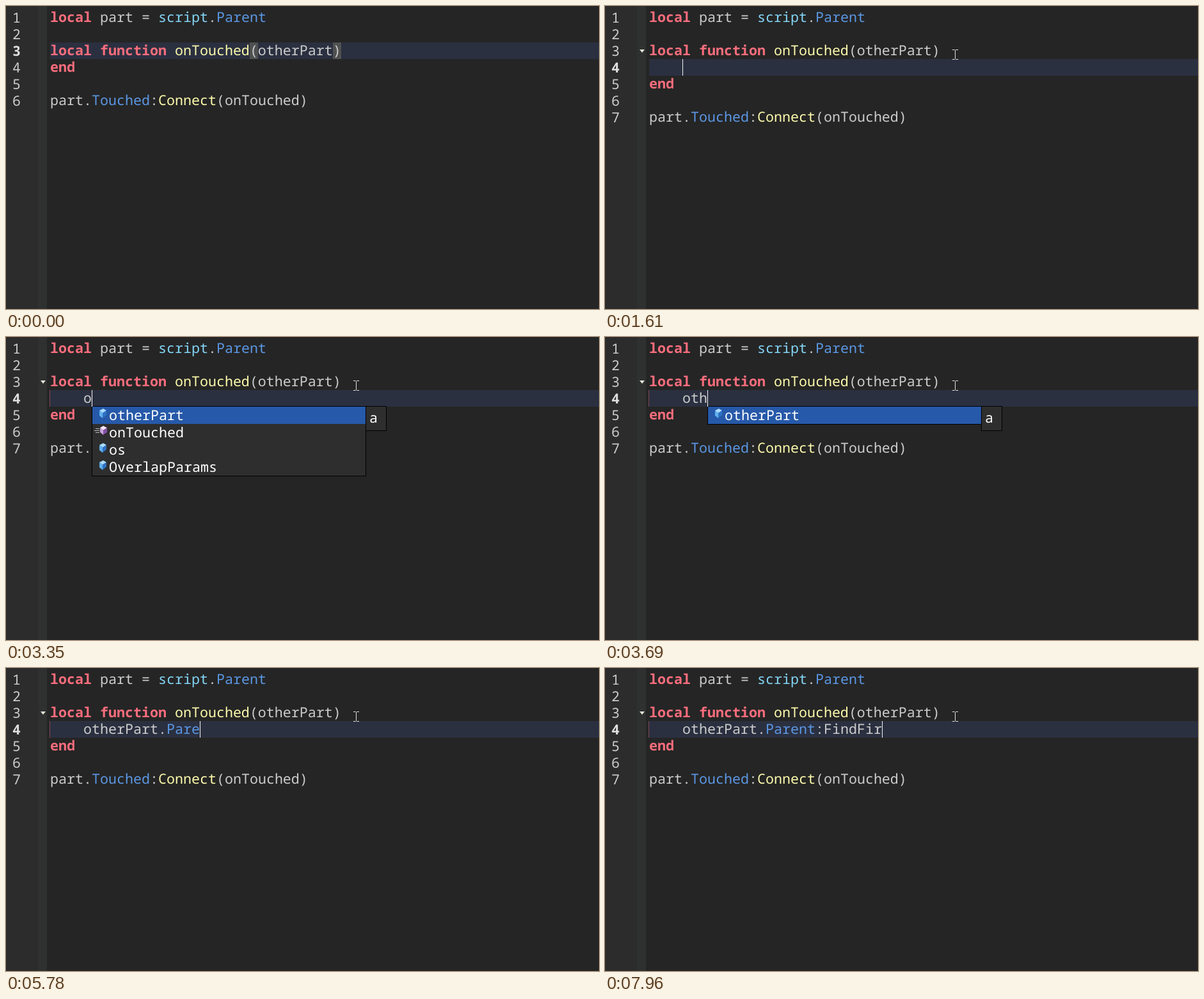
Recreate the animation shown at these times as an HTML page. Size 927 by 474 pixels, loop 8000 ms.

```html
<!DOCTYPE html>
<html lang="en">
<head>
<meta charset="utf-8">
<title>Script editor</title>
<style>
html, body { margin: 0; width: 100%; height: 100%; overflow: hidden; background: #252525; }
svg { display: block; width: 927px; height: 474px; }
text {
  font: 21.667px "Noto Sans Mono", monospace;
  white-space: pre;
  text-rendering: geometricPrecision;
  fill: #ccc;
}
.keyword { font-weight: 700; fill: #f86d7c; }
.func { fill: #fdfbac; }
.prop { fill: #5b97e4; }
.global { fill: #84d6f7; }
.current { font-weight: 700; fill: #e0e0e0; }
.popup text { fill: #fff; }
.panel { fill: #2e2e2e; stroke: #000; }
.crisp { shape-rendering: crispEdges; }
</style>
</head>
<body>
<svg viewBox="0 0 927 474">
  <defs>
    <g id="cube">
      <path d="M146 115 152 112 157 115 151 119Z" fill="#a9dcff"/>
      <path d="M146 115 151 119V127L146 123Z" fill="#62b1ee"/>
      <path d="M157 115 151 119V127L157 122Z" fill="#2f72c4"/>
    </g>
    <g id="method">
      <path d="M147 115 152 112 158 115 152 119Z" fill="#f3e6fa"/>
      <path d="M147 115 152 119V126L147 122Z" fill="#c9a4dc"/>
      <path d="M158 115 152 119V126L158 122Z" fill="#8551a5"/>
      <path d="M140 116.5H146M138 119.5H146M140 122.5H146" stroke="#bbb"/>
    </g>
  </defs>

  <g class="crisp">
    <rect width="50" height="474" fill="#2c2c2c"/>
    <rect x="50" width="14" height="474" fill="#2e312f"/>
    <rect id="row" x="69" y="57" width="858" height="26" fill="#2b3040"/>
    <g id="brackets" fill="#4f5050">
      <rect x="381" y="57" width="13" height="26"/>
      <rect x="511" y="57" width="13" height="26"/>
    </g>
    <rect id="guide" x="68" y="83" width="1" height="26" fill="#7e4a57"/>
  </g>

  <g id="numbers"></g>
  <path id="fold" d="M54 68H62L58 73Z" fill="#e4e4d8"/>

  <text x="69" y="25"><tspan class="keyword">local</tspan> part = <tspan class="global">script</tspan>.<tspan class="prop">Parent</tspan></text>
  <text x="69" y="77"><tspan class="keyword">local function</tspan> <tspan class="func">onTouched</tspan>(otherPart)</text>
  <text x="121" y="103"><tspan id="object"></tspan><tspan id="property" class="prop"></tspan><tspan id="call"></tspan></text>
  <g id="tail">
    <text x="69" y="103" class="keyword">end</text>
    <text x="69" y="155">part.<tspan class="prop">Touched</tspan>:<tspan class="func">Connect</tspan>(onTouched)</text>
  </g>
  <rect id="underline" class="crisp" x="121" y="104" height="1" fill="#f04a4a"/>

  <g id="popup" class="popup">
    <rect id="list" class="panel" x="134.5" y="108.5" width="428"/>
    <rect x="135" y="109" width="427" height="27" fill="#2659a9"/>
    <use href="#cube"/>
    <text x="161" y="130">otherPart</text>
    <g id="others">
      <use href="#method" y="27"/>
      <text x="161" y="157">onTouched</text>
      <use href="#cube" y="54"/>
      <text x="161" y="184">os</text>
      <use href="#cube" y="81"/>
      <text x="161" y="211">OverlapParams</text>
    </g>
    <rect class="panel" x="562.5" y="108.5" width="32" height="38"/>
    <text x="568" y="134">a</text>
  </g>

  <rect id="caret" class="crisp" width="1" height="26" fill="#f4f4f4"/>
  <path id="mouse" d="M0 .5H3.5L4.5 1.5 5.5 .5H9M4.5 1.5V14.5M0 15.5H3.5L4.5 14.5 5.5 15.5H9" fill="none" stroke="#e6e6e6"/>
</svg>
<script>
const LOOP = 8000, CHAR = 13, ROW = 26;
const CODE = "otherPart.Parent:FindFir";
const $ = id => document.getElementById(id);
const show = (id, on) => $(id).setAttribute("visibility", on ? "visible" : "hidden");
const place = (id, x, y) => $(id).setAttribute("transform", `translate(${x} ${y})`);

const numbers = Array.from({ length: 7 }, (_, i) => {
  const label = document.createElementNS("http://www.w3.org/2000/svg", "text");
  label.textContent = i + 1;
  label.setAttribute("x", 10);
  label.setAttribute("y", 26 + i * ROW);
  return $("numbers").appendChild(label);
});

const initial = {
  mouse: null, brackets: true, split: false, typed: 0,
  caret: false, popup: 0, underline: 0
};
const type = (t, typed, more) => [t, { typed, caret: true, underline: 0, ...more }];
const blink = (t, caret = false) => [t, { caret }];
const move = (t, x, y) => [t, { mouse: [x, y] }];

// The pointer sweeps in with a quadratic ease-out.
const sweep = Array.from({ length: 6 }, (_, i) => {
  const left = (1 - i / 5) ** 2;
  return move(30 + i * 30, Math.round(516 + 336 * left), Math.round(69 + 363 * left));
});

const timeline = [
  ...sweep,
  move(320, 513, 67), move(480, 513, 65), move(510, 513, 64),
  move(750, 518, 65), move(810, 529, 66), move(870, 538, 67), move(910, 542, 67),
  [940, { brackets: false, caret: true }],
  move(1040, 543, 68),
  blink(1440),
  [1610, { split: true, caret: true }],
  blink(1950), blink(2480, true), blink(2980),
  type(3350, 1, { popup: 4 }),
  type(3520, 2, { popup: 1 }), type(3610, 3), type(3700, 4), type(3790, 5),
  [4060, { popup: 0 }],
  type(4090, 9),
  [4560, { underline: 9 }], blink(4590),
  type(4620, 10),
  type(4990, 11), blink(5100),
  type(5440, 12), blink(5640), type(5710, 13), type(5780, 14),
  type(5950, 15), blink(6130), type(6160, 16),
  [6560, { underline: 16 }], blink(6700),
  type(6730, 17),
  type(7100, 18), type(7220, 19), type(7340, 20), type(7460, 21),
  blink(7730), type(7800, 22), type(7880, 23), type(7960, 24)
];

function render(time) {
  const s = { ...initial };
  for (const [t, change] of timeline) if (t <= time) Object.assign(s, change);

  const current = s.split ? 3 : 2;
  const top = 5 + current * ROW;
  numbers.forEach((label, i) => {
    label.setAttribute("class", i === current ? "current" : "");
    label.setAttribute("visibility", i < 6 || s.split ? "visible" : "hidden");
  });
  $("row").setAttribute("y", top);
  place("tail", 0, s.split ? ROW : 0);
  show("brackets", s.brackets);
  show("fold", s.split);
  show("guide", s.typed > 0);

  const text = CODE.slice(0, s.typed);
  $("object").textContent = text.slice(0, 10);
  $("property").textContent = text.slice(10, 16);
  $("call").textContent = text.slice(16);
  $("underline").setAttribute("width", s.underline * CHAR);

  show("popup", s.popup > 0);
  show("others", s.popup > 1);
  $("list").setAttribute("height", s.popup * 27 + 1);
  place("popup", Math.max(0, s.typed - 1) * CHAR, 0);

  show("caret", s.caret);
  place("caret", s.split ? 121 + s.typed * CHAR : 524, top);
  show("mouse", s.mouse);
  if (s.mouse) place("mouse", ...s.mouse);
}

const start = performance.now();
function tick() {
  render((performance.now() - start) % LOOP);
  requestAnimationFrame(tick);
}
tick();
</script>
</body>
</html>
```
